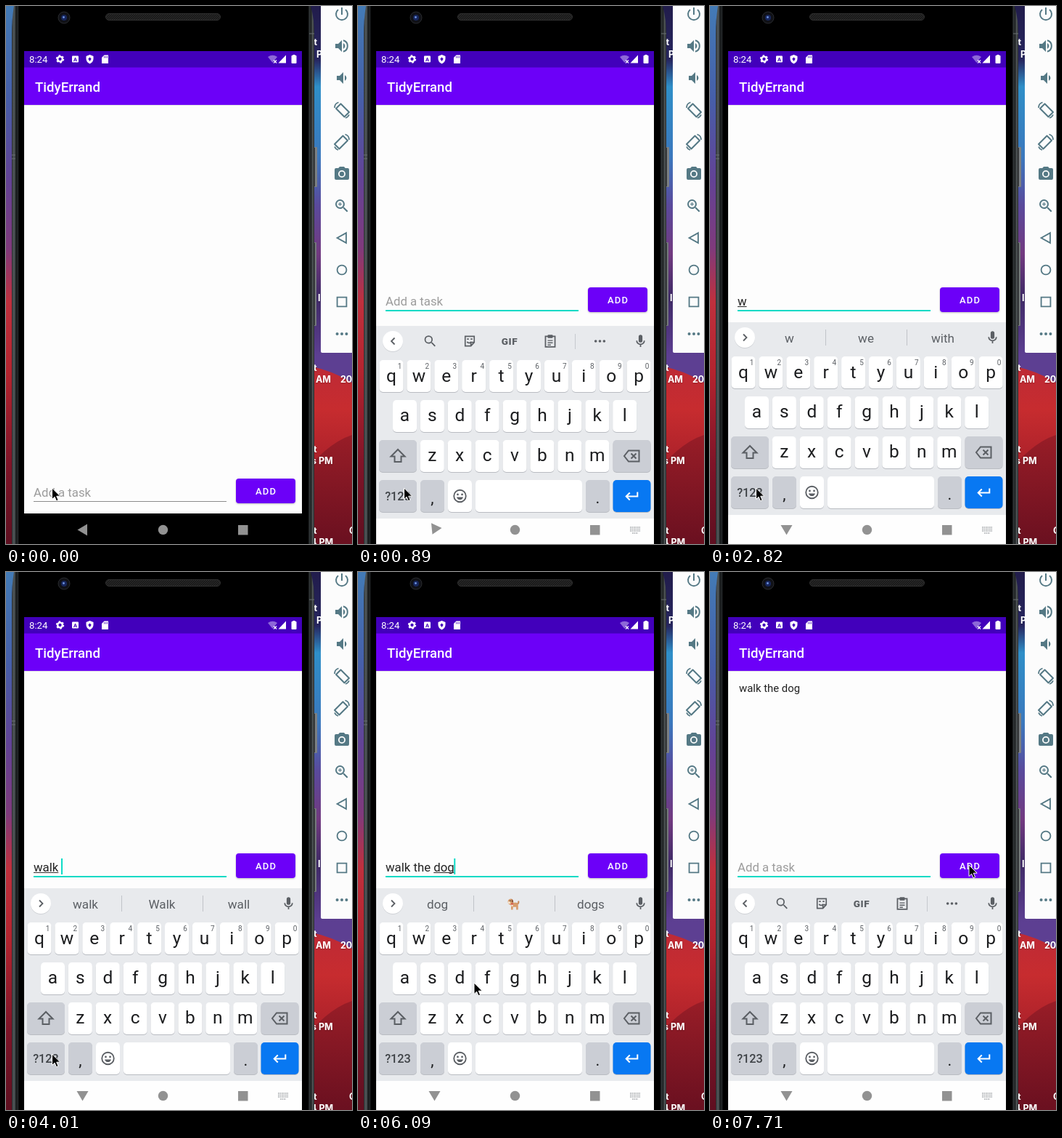
Write an HTML page that moves like this. It is 477 px wide and 740 px high and loops after 8 s.

```html
<!DOCTYPE html>
<html lang="en">
<head>
<meta charset="utf-8">
<title>Task list demo</title>
<style>
html, body { margin: 0; width: 100%; height: 100%; overflow: hidden; background: #000; }
svg { display: block; width: 477px; height: 740px; }
text { font-family: Roboto, "Open Sans", sans-serif; white-space: pre; }
.mid { text-anchor: middle; }
.label { font: 700 12.5px Inter, "Open Sans", sans-serif; fill: #fff; }
</style>
</head>
<body>
<svg id="stage" viewBox="0 0 477 740">
  <defs>
    <linearGradient id="leftSky" x2="0" y2="1">
      <stop offset="0" stop-color="#437bb6"/><stop offset=".17" stop-color="#465fa9"/>
      <stop offset=".32" stop-color="#624396"/><stop offset=".45" stop-color="#7f3a7c"/>
      <stop offset=".55" stop-color="#bf303d"/><stop offset=".68" stop-color="#b3242f"/>
      <stop offset=".85" stop-color="#7f1428"/><stop offset="1" stop-color="#5e0f20"/>
    </linearGradient>
    <linearGradient id="rightSky" x2="0" y2="1">
      <stop offset="0" stop-color="#211c4b"/><stop offset=".1" stop-color="#27265f"/>
      <stop offset=".15" stop-color="#2f8fc8"/><stop offset=".28" stop-color="#3b78bd"/>
      <stop offset=".37" stop-color="#5a4a9c"/><stop offset=".46" stop-color="#723a80"/>
      <stop offset=".54" stop-color="#3f2a66"/><stop offset=".65" stop-color="#5d3f92"/>
    </linearGradient>
    <linearGradient id="redHill" x2="0" y2="1">
      <stop offset="0" stop-color="#bd2a36"/><stop offset=".25" stop-color="#c72c2f"/>
      <stop offset=".5" stop-color="#b0232b"/><stop offset="1" stop-color="#8c1924"/>
    </linearGradient>
    <linearGradient id="darkHill" x2="0" y2="1">
      <stop offset="0" stop-color="#981d27"/><stop offset="1" stop-color="#6a1020"/>
    </linearGradient>
    <linearGradient id="frame">
      <stop offset="0" stop-color="#1d2022"/><stop offset=".004" stop-color="#4e5456"/>
      <stop offset=".011" stop-color="#43494b"/><stop offset=".0135" stop-color="#131516"/>
      <stop offset=".019" stop-color="#25292b"/><stop offset=".025" stop-color="#000"/>
      <stop offset=".979" stop-color="#000"/><stop offset=".985" stop-color="#34393b"/>
      <stop offset=".989" stop-color="#1c1f20"/><stop offset=".995" stop-color="#555b5d"/>
      <stop offset="1" stop-color="#1f2223"/>
    </linearGradient>
    <pattern id="mesh" width="3" height="3" patternUnits="userSpaceOnUse">
      <path d="M0 0h3v3h-3z" fill="#191919"/><path d="M0 3L3 0" stroke="#333" stroke-width=".8"/>
    </pattern>
    <clipPath id="screen"><path d="M25 62h383v678h-383z"/></clipPath>
    <filter id="soft" x="-30%" y="-30%" width="160%" height="180%">
      <feDropShadow dx="0" dy="1" stdDeviation="1" flood-opacity=".25"/>
    </filter>
  </defs>
  <g id="desk"></g>
  <g id="phone"></g>
  <g clip-path="url(#screen)">
    <g id="app"></g>
    <text id="item" x="40" y="164.5" font-size="14.9" fill="#222">walk the dog</text>
    <g id="entry">
      <path id="rule"/>
      <text id="field" x="38" y="411.5" font-size="16.8"/>
      <path id="spell" stroke="#333" stroke-width="1.1"/>
      <rect id="caret" y="394" width="1.9" height="22" fill="#03dac5"/>
      <rect x="317" y="387" width="82" height="34" rx="4" fill="#6c00f8" filter="url(#soft)"/>
      <rect id="ripple" x="317" y="387" width="82" height="34" rx="4" fill="#fff"/>
      <text class="mid" x="358.5" y="409" font-size="13" font-weight="500" letter-spacing="1.17" fill="#fff">ADD</text>
    </g>
    <g id="keyboard"></g>
    <g id="nav" fill="#929292">
      <path id="back" d="M-8 -6.5H8L0 7z"/>
      <circle cx="216.500" cy="720.500" r="6.700"/>
      <path d="M320 714h13.500v13.500h-13.500z"/>
    </g>
  </g>
  <path id="mouse" d="M0 0V15.500L3.600 12.200 6 17.700 8.600 16.600 6.200 11.200H11.200z" fill="#000" stroke="#fff" stroke-width="1"/>
</svg>
<script>
const $ = id => document.getElementById(id);
const attr = (id, props) => {
  for (const name in props) $(id).setAttribute(name, props[name]);
};
const rect = (x, y, w, h, fill, rx = 0) =>
  `<rect x="${x}" y="${y}" width="${w}" height="${h}" rx="${rx}" fill="${fill}"/>`;
const text = (s, x, y, size, fill, extra = 'class="mid"') =>
  `<text x="${x}" y="${y}" font-size="${size}" fill="${fill}" ${extra}>${s}</text>`;
const solid = (d, fill) => `<path d="${d}" fill="${fill}" fill-rule="evenodd"/>`;
const line = (d, color, w = 2) =>
  `<path d="${d}" fill="none" stroke="${color}" stroke-width="${w}"/>`;
// Places artwork drawn on a 24 unit grid around a centre point.
const icon = (x, y, size, art) =>
  `<g transform="translate(${x - size / 2} ${y - size / 2}) scale(${size / 24})">${art}</g>`;
const dots = fill => [5, 12, 19].map(x => `<circle cx="${x}" cy="12" r="2.2" fill="${fill}"/>`).join('');

const lens = 'M15.5 14h-.79l-.28-.27A6.47 6.47 0 0 0 16 9.5 6.5 6.5 0 1 0 9.5 16c1.61 0 3.09-.59 4.23-1.57l.27.28v.79l5 4.99L20.49 19zM9.500 14a4.500 4.500 0 1 1 0-9 4.500 4.500 0 0 1 0 9z';

function drawDesk() {
  const c = '#557985';
  const speaker = 'M3 9v6h4l5 5V4L7 9z';
  const turn = `<g stroke-linejoin="round">${line('M10.500 3.500L22 15 15.500 21.500 4 10z', c)}</g>` +
    line('M2 9Q2 3 7.500 1.500M22 18.500Q20.500 22 17 23', c, 1.8);
  const tools = [
    line('M12 3v10M7 6a8 8 0 1 0 10 0', c),
    solid(speaker, c) + solid('M14 8a4.500 4.500 0 0 1 0 8z', c) + line('M14 4.300a8 8 0 0 1 0 15.400', c),
    solid('M5 9v6h4l5 5V4L9 9z', c) + solid('M16 8a4.500 4.500 0 0 1 0 8z', c),
    turn,
    `<g transform="matrix(-1 0 0 1 24 0)">${turn}</g>`,
    solid('M9 2L7.200 4H4a2 2 0 0 0-2 2v12a2 2 0 0 0 2 2h16a2 2 0 0 0 2-2V6a2 2 0 0 0-2-2h-3.200L15 2zM12 7a5 5 0 1 1 0 10 5 5 0 0 1 0-10z', c) +
      `<circle cx="12" cy="12" r="3.200" fill="${c}"/>`,
    solid(lens, c) + line('M9.500 7v5M7 9.500h5', c, 1.2),
    line('M18.500 4.500v15L5 12z', c),
    `<circle cx="12" cy="12" r="7" fill="none" stroke="${c}" stroke-width="2"/>`,
    line('M5 5h14v14H5z', c),
    dots(c)
  ];
  const labels = [
    ['t', 424.500, 54], ['P', 428, 71], ['I', 430, 406], ['t', 424, 502], ['AM', 427, 518], ['20', 461, 518],
    ['t', 424, 614], ['s PM', 421, 630], ['t', 424, 726], ['C', 473, 726], ['4 PM', 420, 742]
  ];
  $('desk').innerHTML =
    rect(0, 0, 30, 740, 'url(#leftSky)') + rect(400, 0, 77, 740, 'url(#rightSky)') +
    solid('M400 492Q445 498 477 518V740H400z', 'url(#redHill)') +
    solid('M400 655Q440 602 477 590V740H400z', 'url(#darkHill)') +
    '<g filter="url(#soft)">' +
    labels.map(([s, x, y]) => text(s, x, y, 12.5, '#fff', 'class="label"')).join('') + '</g>' +
    rect(434, -20, 70, 497, '#fcfcfc', 2) +
    tools.map((art, i) => icon(463, 11 + i * 44, i < 7 ? 24 : 22, art)).join('');
}

function drawPhone() {
  $('phone').innerHTML =
    rect(424, 194, 5, 55, '#7b7f82', 1) + rect(424, 325, 4, 115, '#74787b', 1) +
    line('M425.500 195v53M425.500 326v113', '#3b3d3f', 1) +
    solid('M8 740V38Q8 18 11 0H420Q425 18 425 38V740z', 'url(#frame)') +
    line('M8 205h5M8 210h5M418 38h7', '#6a7072', 1) +
    rect(137.500, 10.500, 158, 9, 'url(#mesh)', 4.500) +
    '<rect x="137.500" y="10.500" width="158" height="9" rx="4.500" fill="none" stroke="#303030"/>' +
    '<circle cx="80" cy="16" r="8" fill="#101116" stroke="#292b2e"/>' +
    '<circle cx="80" cy="16" r="4" fill="#17265c"/><circle cx="79.500" cy="15.500" r="1.400" fill="#6d92e0"/>';
}

function drawApp() {
  const w = '#fff';
  const gear = '<circle cx="12" cy="12" r="6.200" fill="none" stroke="#fff" stroke-width="4.500"/>' +
    '<circle cx="12" cy="12" r="9" fill="none" stroke="#fff" stroke-width="3" stroke-dasharray="4.700"/>';
  $('app').innerHTML =
    rect(25, 62, 383, 678, '#fdfdfd') + rect(25, 698, 383, 42, '#000') +
    rect(25, 136, 383, 1, '#dedce4') +
    rect(25, 84, 383, 52, '#6c00f8') + rect(25, 62, 383, 22.500, '#4200bb') +
    text('8:24', 32, 78, 13.2, w, '') + text('TidyErrand', 40, 117.500, 18.64, w, 'font-weight="500"') +
    icon(74.500, 73, 13, gear) +
    rect(91, 68.500, 9, 9, w, 1) + text('A', 95.500, 76, 7.5, '#4200bb', 'class="mid" font-weight="700"') +
    solid('M115.500 67L120.500 69V73Q120 77.500 115.500 79.500 111 77.500 110.500 73V69z', w) +
    solid('M115.500 70.500l2.200 2.200-2.200 3.300-2.200-3.300z', '#4200bb') +
    solid('M135.500 67.500H141V79H132V71z', w) + line('M135.500 69v2.500M137.500 69v2.500M139.500 69v2.500', '#4200bb', .8) +
    solid('M361 70Q367.500 65.500 374 70L367.500 78z', '#8d68d8') +
    line('M369 74.500l4 4M373 74.500l-4 4', w, 1.2) +
    solid('M386 67.500V78.500H375.500z', w) +
    rect(393.500, 68, 7, 11, w, 1) + rect(395.300, 67, 3.400, 2, w);
}

function keyCap(x, y, w, fill = '#fff') {
  return rect(x, y + 1, w, 44, '#b9bcc2', 5) + rect(x, y, w, 44, fill, 5);
}

function drawKeyboard() {
  const ink = '#5b5f64', dark = '#1c1d1f', grey = '#cbced5';
  let keys = '';
  [['qwertyuiop', 46, 482, 512], ['asdfghjkl', 64.500, 537, 566], ['zxcvbnm', 102.300, 592, 621]].forEach(([row, x0, y, base], r) => {
    [...row].forEach((ch, i) => {
      const x = x0 + i * 37.900;
      keys += keyCap(x - 16.500, y, 33) + text(ch, x, base, 24.5, dark);
      if (!r) keys += text((i + 1) % 10, x + 11.500, y + 11.500, 10, ink);
    });
  });
  keys += [[29, 592], [351.500, 592], [29, 647]].map(([x, y]) => keyCap(x, y, 52, grey)).join('') +
    [86, 314].map(x => keyCap(x, 647, 33, grey)).join('') +
    keyCap(124, 647, 33) + keyCap(162, 647, 147) + keyCap(351.500, 647, 52, '#0878f2') +
    text('?123', 55, 675, 16.3, '#3f4347', 'class="mid" font-weight="500"') +
    text(',', 102.500, 679, 22, dark) + text('.', 330.500, 679, 22, dark) +
    icon(55, 614, 24, line('M12 3L2.500 12.500H7.500V20H16.500V12.500H21.500z', ink)) +
    icon(377.500, 614, 24, line('M7.500 4.500H22V19.500H7.500L1.500 12zM11 8.500l7 7M18 8.500l-7 7', ink)) +
    icon(140.500, 669, 22, `<circle cx="12" cy="12" r="9" fill="none" stroke="${ink}" stroke-width="2"/>` +
      `<circle cx="8.700" cy="9.700" r="1.500" fill="${ink}"/><circle cx="15.300" cy="9.700" r="1.500" fill="${ink}"/>` +
      solid('M7 13.500h10q-1.500 4-5 4t-5-4z', ink)) +
    icon(377.500, 669, 22, line('M20.500 6v6.500H4M9 7l-5.500 5.500L9 18', '#fff', 2.2));

  const sticker = line('M4.500 4H19.500V14L14 20H4.500zM19.500 14H14V20M7.500 13q3.500 4 7 0', ink) +
    line('M7.500 8.500h3M13.500 8.500h3', ink);
  const clip = line('M4.500 4.500H19.500V21H4.500z', ink) + rect(8, 2, 8, 5, ink, 1) +
    line('M8 11h8M8 14.500h8M8 18h5', ink, 1.6);
  const mic = rect(9, 2, 6, 12, ink, 3) + line('M6 11a6 6 0 0 0 12 0M12 17v4', ink);
  const tools = line('M50.500 451.500L46 456l4.500 4.500', ink, 1.8) +
    icon(99.500, 456, 21, solid(lens, ink)) + icon(154, 456, 20, sticker) +
    text('GIF', 209, 461, 13.5, ink, 'class="mid" font-weight="900" letter-spacing=".6"') +
    icon(265, 456, 21, clip) + line('M299.500 446v21', '#c6c9ce', 1) + icon(333.500, 456, 20, dots(ink));
  const words = line('M46 451.500l4.500 4.500-4.500 4.500', ink, 1.8) +
    line('M159.500 445v22M271.500 445v22', '#c0c3c8', 1) +
    [109.500, 215, 321].map((x, i) => `<text id="word${i}" class="mid" x="${x}" y="462.500" font-size="17.1" fill="${ink}"/>`).join('') +
    '<g id="dog">' + icon(214, 457, 18,
      line('M19 12q4-2 2.500-6', '#c78a5c', 2.6) +
      solid('M2 7Q3 2 8 2 12 2 12 9H18Q21 10 21 15V22H17.500V17H11.500V22H8V14Q2 12 2 7z', '#d79c6c') +
      solid('M2 7h4l1 4H3zM8.500 12h3v4h-3z', '#f6e2cc') + solid('M9 3q4 1 3 6l-3-1z', '#8f5638') +
      line('M8 11.500h4', '#d03c3c', 2) + '<circle cx="6.500" cy="5.800" r="1" fill="#333"/>') + '</g>';

  $('keyboard').innerHTML =
    rect(25, 435, 383, 265, '#e8eaed') + rect(25, 700, 383, 350, '#fefefe') +
    '<circle cx="48" cy="457" r="14" fill="#cfd2d6"/><circle cx="48" cy="456" r="14" fill="#fff"/>' +
    `<g id="tools">${tools}</g><g id="words">${words}</g>` + icon(389.500, 456, 21, mic) + keys;
  const grid = [0, 1, 2].map(r => `M375 ${717 + r * 2.500}h14`).join('');
  $('nav').insertAdjacentHTML('beforeend', `<g id="picker"><path d="${grid}M378 725h8" fill="none" stroke="#a8abae" stroke-width="1.500" stroke-dasharray="1.700 .8"/></g>`);
}

// time, text, first underlined letter, suggestions, suggestion opacity
const walk = 'walk,Walk,wall', out = 'door,way,bus', pet = 'dog,*,dogs';
const typing = [
  [0, '', -1, '', 0],
  [2230, 'w', 0, '', 0],
  [2380, 'w', 0, 'w,we,with', .5],
  [2520, 'w', 0, 'w,we,with', 1],
  [3420, 'wa', 0, 'was,want,wanted', 1],
  [3560, 'wal', 0, 'wal,walk,wall', 1],
  [3710, 'walk', 0, walk, 1],
  [4010, 'walk ', 0, walk, 1],
  [4160, 'walk ', -1, 'to,the,around', 1],
  [4300, 'walk t', 5, 't,the,to', 1],
  [4600, 'walk th', 5, 'the,that,this', 1],
  [4750, 'walk the', 5, 'the,them,they', 1],
  [4900, 'walk the ', 5, 'the,them,they', 1],
  [5050, 'walk the ', -1, out, 1],
  [5200, 'walk the d', -1, out, 1],
  [5490, 'walk the do', 9, 'do,dog,don', 1],
  [5640, 'walk the dog', 9, 'do,dog,don', 1],
  [5940, 'walk the dog', 9, pet, 1],
  [7120, '', -1, pet, 1],
  [7270, '', -1, pet, .5],
  [7420, '', -1, '', 0]
];
// time, keyboard drop, opacity, back arrow angle
const rising = [[0, 310, 0, 90], [590, 110, .4, 85], [740, 30, .9, 60], [890, 5, 1, 25], [1040, 0, 1, 0]];
const pointer = [
  [0, 63.500, 663], [5940, 84, 642], [6090, 160, 565], [6240, 262, 475], [6390, 350, 420],
  [6530, 404, 396], [6680, 385, 400], [6830, 364, 404], [6980, 357, 403]
];
const blinks = [300, 890, 1330, 1930, 2230, 2820, 3420, 6240, 6680, 7710];
const press = [[0, 0], [7120, .25], [7270, .1], [7420, 0]];

const at = (rows, t) => rows.filter(row => row[0] <= t).pop();
const ruler = document.createElement('canvas').getContext('2d');
const width = s => {
  ruler.font = '16.8px Roboto, "Open Sans", sans-serif';
  return ruler.measureText(s).width;
};

function draw(t) {
  const [, value, mark, words, shown] = at(typing, t);
  const [, drop, alpha, angle] = at(rising, t);
  const [, mx, my] = at(pointer, t);
  const focused = t >= 300;
  const end = 38 + width(value);

  attr('entry', { transform: `translate(0 ${t < 590 ? 263 : 0})` });
  attr('rule', {
    d: `M38 ${focused ? 419 : 418.500}H304`,
    stroke: focused ? '#03dac5' : '#8b8b8b', 'stroke-width': focused ? 2 : 1
  });
  $('field').textContent = value || 'Add a task';
  attr('field', { fill: value ? '#222' : '#9c9c9c' });
  const trimmed = 38 + width(value.trimEnd());
  attr('spell', { d: mark < 0 ? '' : `M${38 + width(value.slice(0, mark))} 413.500H${trimmed}` });
  attr('caret', { x: end - .4, opacity: blinks.filter(b => b <= t).length % 2 });
  attr('ripple', { opacity: at(press, t)[1] });
  attr('item', { opacity: t >= 7120 ? 1 : 0 });

  attr('keyboard', { transform: `translate(0 ${drop})`, opacity: alpha });
  attr('tools', { opacity: 1 - shown });
  attr('words', { opacity: shown });
  const list = words.split(',');
  for (let i = 0; i < 3; i++) $('word' + i).textContent = (list[i] || '').replace('*', '');
  attr('dog', { opacity: list[1] === '*' ? 1 : 0 });

  attr('picker', { opacity: alpha });
  attr('back', { transform: `translate(105.500 720.500) rotate(${angle})` });
  attr('mouse', { transform: `translate(${mx} ${my})` });
}

drawDesk();
drawPhone();
drawApp();
drawKeyboard();

function tick() {
  draw(performance.now() % 8000);
  requestAnimationFrame(tick);
}
tick();
</script>
</body>
</html>
```
